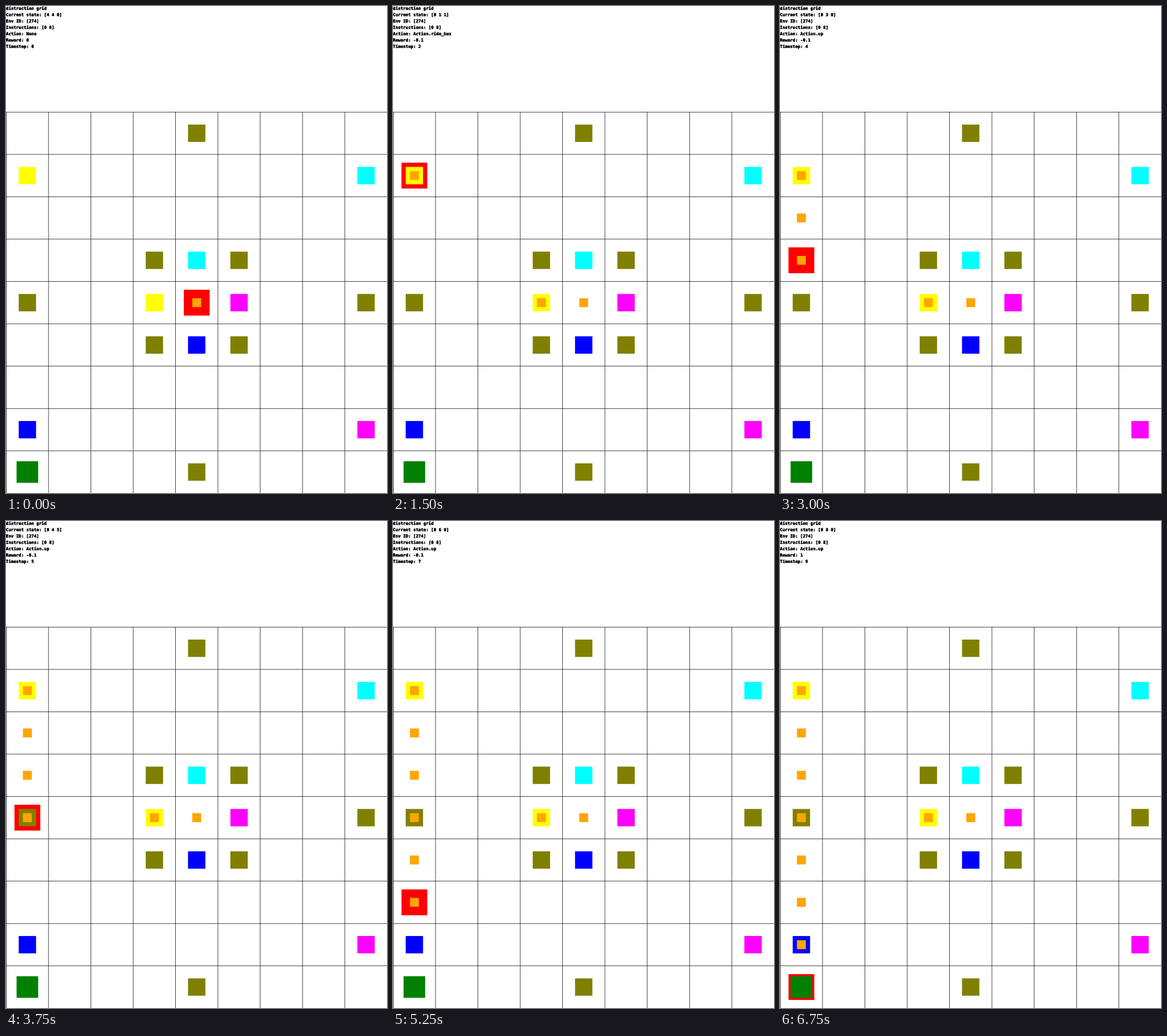
A matplotlib script for the animation above (7.5 s loop, 662 by 846 pixels).

```python
import matplotlib.patheffects as pe
import matplotlib.pyplot as plt
from matplotlib.animation import FuncAnimation
from matplotlib.patches import Rectangle

W, H, DPI = 662, 846, 100

# World units: nine cells of 100 below a 250 high header.
N, CELL, TOP = 9, 100, 250
SIDE = N * CELL
LINE, CHAR = 15, 6
STEPS, STEP_MS = 10, 750

STOPS = {
    "yellow": [(3, 4), (0, 1)],
    "cyan": [(4, 3), (8, 1)],
    "blue": [(4, 5), (0, 7)],
    "magenta": [(5, 4), (8, 7)],
    "olive": [(3, 3), (5, 3), (3, 5), (5, 5), (4, 0), (0, 4), (8, 4), (4, 8)],
}
IDS = {"yellow": 1, "cyan": 2, "blue": 3, "magenta": 4, "olive": 5}
ID_AT = {pos: IDS[color] for color, cells in STOPS.items() for pos in cells}
GOAL = (0, 8)

# One walk to the stop, a bus ride, then straight along the first column.
PATH = [(4, 4), (3, 4)] + [(0, y) for y in range(1, N)]
ACTIONS = ["None", "Action.left", "Action.ride_bus"] + ["Action.up"] * 7

fig = plt.figure(figsize=(W / DPI, H / DPI), dpi=DPI, facecolor="white")
ax = fig.add_axes([0, 0, 1, 1])
ax.set_xlim(0, SIDE)
ax.set_ylim(TOP + SIDE, 0)
ax.axis("off")


def block(x, y, w, h, color, z):
    return ax.add_patch(Rectangle((x, y), w, h, facecolor=color, linewidth=0,
                                  snap=False, zorder=z))


def square(pos, size, color, z):
    margin = (CELL - size) / 2
    x, y = pos[0] * CELL + margin, TOP + pos[1] * CELL + margin
    return block(x, y, size + 1, size + 1, color, z)


def text_line(i):
    size = CHAR * W / SIDE / 0.602 * 72 / DPI
    outline = pe.withStroke(linewidth=0.2, foreground="black")
    return ax.text(0, LINE * i + 9, "", family="DejaVu Sans Mono",
                   weight="bold", size=size, color="black",
                   va="baseline", ha="left", path_effects=[outline])


for k in range(N):
    block(k * CELL, TOP, 1, SIDE, "black", 0)
    block(0, TOP + k * CELL, SIDE, 1, "black", 0)

for color, cells in STOPS.items():
    for pos in cells:
        square(pos, 40, color, 2)
square(GOAL, 50, "green", 4)

agents = [square(pos, 60, "red", 1) for pos in PATH]
trail = [square(pos, 20, "orange", 3) for pos in PATH]
labels = [text_line(i) for i in range(7)]


def reward(step):
    if step == 0:
        return "0"
    return "1" if PATH[step] == GOAL else "-0.1"


def draw(step):
    x, y = PATH[step]
    lines = [
        "distraction grid",
        f"Current state: [{x} {y} {ID_AT.get((x, y), 0)}]",
        "Env ID: [274]",
        f"Instructions: [{GOAL[0]} {GOAL[1]}]",
        f"Action: {ACTIONS[step]}",
        f"Reward: {reward(step)}",
        f"Timestep: {step}",
    ]
    for label, line in zip(labels, lines):
        label.set_text(line)
    for i in range(STEPS):
        agents[i].set_visible(i == step)
        trail[i].set_visible(i <= step)
    return agents + trail + labels


anim = FuncAnimation(fig, draw, frames=STEPS, interval=STEP_MS,
                     init_func=lambda: draw(0), repeat=True, repeat_delay=0)
plt.show()
```
